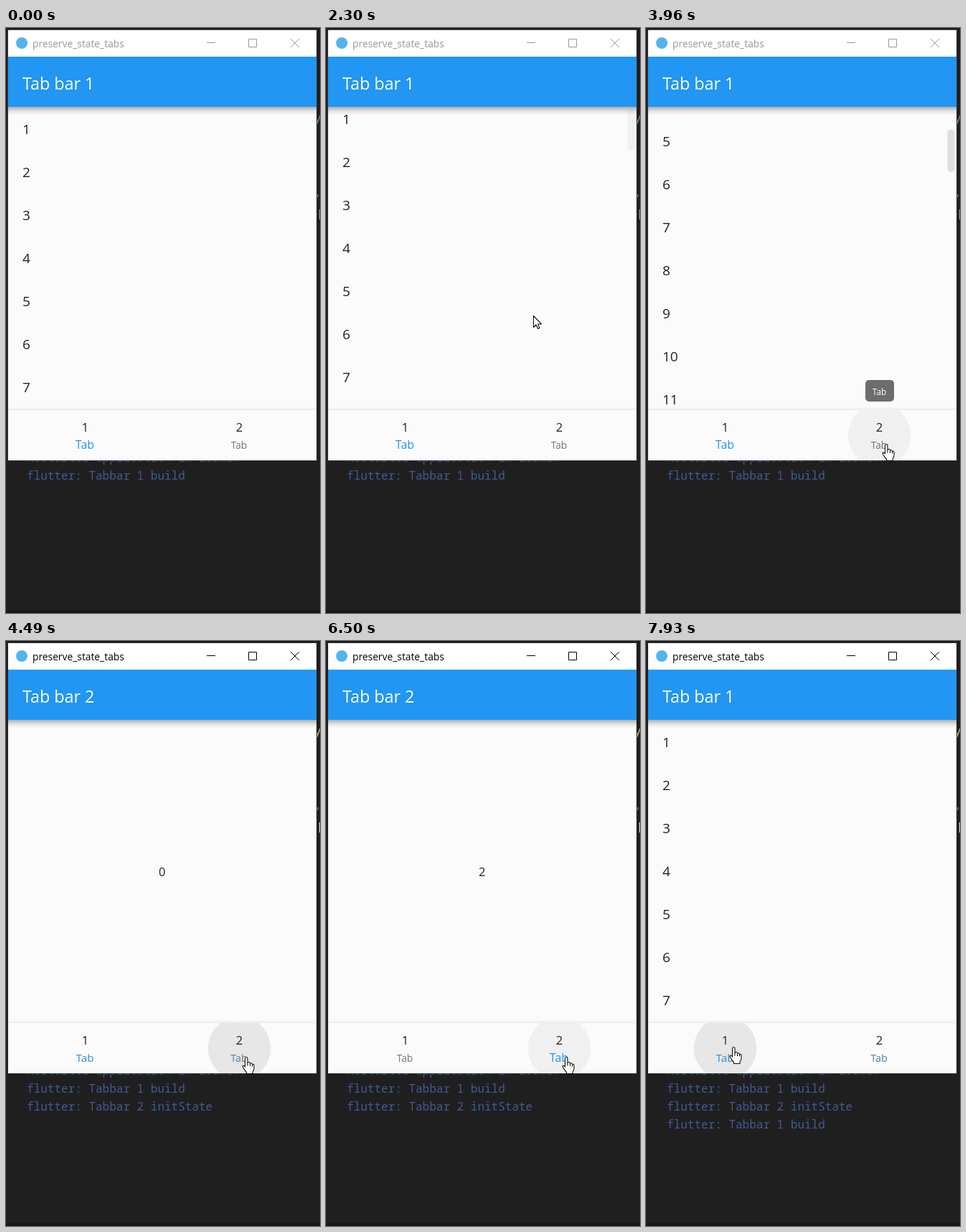
Animation, 438 px wide and 816 px high, one loop 8 s. Source, as an HTML page with a canvas:

```html
<!DOCTYPE html>
<html lang="en">
<head>
<meta charset="utf-8">
<title>preserve_state_tabs</title>
<style>
html, body { margin: 0; width: 100%; height: 100%; overflow: hidden; background: #1f1f1f; }
canvas { display: block; }
</style>
</head>
<body>
<canvas id="stage" width="438" height="816"></canvas>
<script>
const g = document.getElementById('stage').getContext('2d');
const LOOP = 8000;
const FOCUS = 4230, OPEN_2 = 4430, OPEN_1 = 7790;
const SANS = '"Open Sans", "Noto Sans", sans-serif';
const MONO = '"Noto Sans Mono", "DejaVu Sans Mono", monospace';

// Layout of the app window
const LEFT = 3, TOP = 3, WIDTH = 430, BOTTOM = 603;
const HEAD = 40, BODY = 110, BAR = 533, VIEW = BAR - BODY;
const ROW = 60, ROWS = 50;
const TAB_X = [110.5, 325.5], TAB_Y = 568, RADIUS = 43.75;
const BLUE = [33, 150, 243], GREY = [115, 115, 115], INK = '#212121';

// Pointer rests and the moves between them
const ENTRY = { x: 416, y: 799 }, LIST = { x: 289, y: 401 };
const ON_2 = { x: 335, y: 581 }, ON_1 = { x: 125, y: 568 };
const MOVES = [
  { at: 1050, time: 1050, from: ENTRY, via: { x: 400, y: 610 }, to: LIST },
  { at: 3490, time: 470, from: LIST, to: ON_2 },
  { at: 6910, time: 300, from: ON_2, to: ON_1 },
  { at: 7640, time: 80, from: ON_1, to: { x: 122, y: 567 } }
];
const VISITS = [
  { tab: 1, enter: 1570, leave: 1780 },
  { tab: 1, enter: 3735, press: FOCUS, leave: 7050 },
  { tab: 0, enter: 7050, press: 7650, leave: LOOP }
];

const clamp = v => Math.max(0, Math.min(1, v));
const mix = (a, b, k) => a + (b - a) * k;
const ramp = (t, at, time) => clamp((t - at) / time);
const smooth = k => k * k * (3 - 2 * k);
const black = a => `rgba(0,0,0,${a})`;
const fade = (t, on, off, rise, fall) => ramp(t, on, rise) * (1 - ramp(t, off, fall));

function pointerAt(t) {
  const { at, time, from, via, to } = MOVES.filter(m => m.at <= t).pop();
  const k = ramp(t, at, time);
  if (!via) return { x: mix(from.x, to.x, smooth(k)), y: mix(from.y, to.y, smooth(k)) };
  const curve = c => mix(mix(from[c], via[c], k), mix(via[c], to[c], k), k);
  return { x: curve('x'), y: curve('y') };
}

// A long swipe, then a short one; the list is rebuilt when its tab reopens
function scrollAt(t) {
  if (t >= OPEN_1) return 0;
  return 180 * smooth(ramp(t, 2230, 420)) + 43 * ramp(t, 2850, 140);
}

function rect(x, y, w, h, fill) {
  g.fillStyle = fill;
  g.fillRect(x, y, w, h);
}

function round(x, y, w, h, r, fill) {
  g.fillStyle = fill;
  g.beginPath();
  g.roundRect(x, y, w, h, r);
  g.fill();
}

function disc(x, y, r, fill) {
  g.fillStyle = fill;
  g.beginPath();
  g.arc(x, y, r, 0, 7);
  g.fill();
}

function text(s, x, y, size, fill, align = 'left', family = SANS) {
  g.font = `${size}px ${family}`;
  g.textAlign = align;
  g.fillStyle = fill;
  g.fillText(s, x, y);
}

function shade(y, depth, alpha) {
  const s = g.createLinearGradient(0, y, 0, y + depth);
  s.addColorStop(0, black(alpha));
  s.addColorStop(0.5, black(alpha * 0.38));
  s.addColorStop(1, black(0));
  rect(LEFT, y, WIDTH, depth, s);
}

function clipped(y, h, draw) {
  g.save();
  g.beginPath();
  g.rect(LEFT, y, WIDTH, h);
  g.clip();
  draw();
  g.restore();
}

function editor(t) {
  const lit = t >= FOCUS;
  rect(0, 0, 438, 816, '#1f1f1f');
  rect(0, 0, 438, BODY, '#211b20');
  rect(0, 812, 438, 4, '#1b161a');

  const code = (s, x, y, color) => text(s, x, y, 16, lit ? color : '#8a8d92', 'left', MONO);
  code('y', 430, 131, '#c8c88c');
  code(')', 427, 195, '#b0484c');
  code("'", 430, 244, '#c8763c');
  code('[', 433, 265, '#d0d0d0');

  const lines = ['Restarted application in 293ms.', 'flutter: Tabbar 1 build'];
  if (t >= OPEN_2) lines.push('flutter: Tabbar 2 initState');
  if (t >= OPEN_1) lines.push('flutter: Tabbar 1 build');
  lines.forEach((s, i) => text(s, 29, 605 + i * 25, 16, '#425a94', 'left', MONO));
}

function frame(t) {
  const lit = t >= FOCUS, ink = lit ? '#000' : '#999';
  rect(LEFT - 1, TOP - 1, WIDTH + 2, BOTTOM - TOP + 2, lit ? '#303030' : '#424242');
  rect(LEFT, TOP, WIDTH, HEAD - TOP, '#fff');
  rect(LEFT, HEAD, WIDTH, BOTTOM - HEAD, '#fbfbfb');
  disc(22, 21, 8, '#54b5ee');
  text('preserve_state_tabs', 37, 27, 13.8, ink);
  g.strokeStyle = ink;
  g.lineWidth = 1;
  g.stroke(new Path2D('M280 20.5h12M338.5 15.5h11v11h-11zM397 15l12 12M409 15l-12 12'));
}

function list(t) {
  const offset = scrollAt(t);
  for (let n = 1; n <= ROWS; n++) text(n, 23, 88 + n * ROW - offset, 19, INK);
  if (offset) {
    const size = VIEW * VIEW / (ROW * ROWS);
    const y = BODY + offset * VIEW / (ROW * ROWS);
    round(420.5, y, 10, size, 5, black(0.11 * ramp(t, 2230, 200)));
  }
}

function ink(t, { tab, enter, press, leave }) {
  disc(TAB_X[tab], TAB_Y, RADIUS, black(0.045 * fade(t, enter, leave, 50, 50)));
  if (!press || t < press) return;
  const k = ramp(t, press, 250), p = pointerAt(press);
  const alpha = 0.04 * (1 - ramp(t, press + 300, 170));
  disc(mix(p.x, TAB_X[tab], k), mix(p.y, TAB_Y, k), RADIUS * k, black(alpha));
}

function bottomBar(t) {
  rect(LEFT, BAR, WIDTH, BOTTOM - BAR, '#fbfbfb');
  clipped(BAR, BOTTOM - BAR, () => VISITS.forEach(v => ink(t, v)));
  const second = fade(t, OPEN_2, OPEN_1, 200, 200);
  TAB_X.forEach((x, i) => {
    const k = i ? second : 1 - second;
    const color = GREY.map((c, j) => Math.round(mix(c, BLUE[j], k)));
    text(i + 1, x, 563, 16.5, INK, 'center');
    text('Tab', x - 0.5, 587, mix(13.7, 16, k), `rgb(${color})`, 'center');
  });
}

function tooltip(t, { tab, enter, press, leave }) {
  g.globalAlpha = fade(t, enter + 13, press || leave + 100, 150, 75);
  round(TAB_X[tab] - 19.5, 491, 40, 30, 5, 'rgba(97,97,97,.92)');
  text('Tab', TAB_X[tab], 512, 11.8, '#fff', 'center');
  g.globalAlpha = 1;
}

const ARROW = new Path2D('M.5 .5V16.5L4 13L6.7 18.6L9 17.6L6.5 12H11.5Z');
const HAND = new Path2D('M-1.5 13V1.5Q-1.5 -.5 0 -.5Q2 -.5 2 1.5V7Q5 5.5 5.5 8' +
  'Q8 7 8.5 9.5Q11 8.5 11 11.5V15Q11 18 9 20V22.5H.5V20.5' +
  'Q-2.5 17.5 -4.5 13.5Q-5.5 11 -4 11Q-3 11 -1.5 13Z');
const FINGERS = new Path2D('M2 7V11.5M5.5 8V12M8.5 9.5V12.5');

function pointer(t) {
  if (t < MOVES[0].at) return;
  const { x, y } = pointerAt(t), onBar = y > BAR && y < BOTTOM;
  const shape = onBar ? HAND : ARROW;
  g.save();
  g.translate(Math.round(x), Math.round(y));
  g.lineWidth = 1.1;
  g.lineJoin = 'round';
  g.strokeStyle = '#111';
  g.fillStyle = '#fff';
  g.fill(shape);
  g.stroke(shape);
  if (onBar) g.stroke(FINGERS);
  g.restore();
}

function draw(t) {
  const page = t >= OPEN_2 && t < OPEN_1 ? 2 : 1;
  editor(t);
  frame(t);
  clipped(BODY, VIEW, () => {
    if (page === 1) list(t);
    else text(Math.floor((t - OPEN_2) / 1000), 217.7, 328, 16.5, INK, 'center');
  });
  shade(BODY, 11, 0.3);
  shade(BAR, -5, 0.07);
  rect(LEFT, HEAD, WIDTH, BODY - HEAD, `rgb(${BLUE})`);
  text('Tab bar ' + page, 23, 86, 23.3, '#fff');
  bottomBar(t);
  VISITS.forEach(v => tooltip(t, v));
  pointer(t);
}

const began = performance.now();
function loop() {
  draw((performance.now() - began) % LOOP);
  requestAnimationFrame(loop);
}
loop();
</script>
</body>
</html>
```
